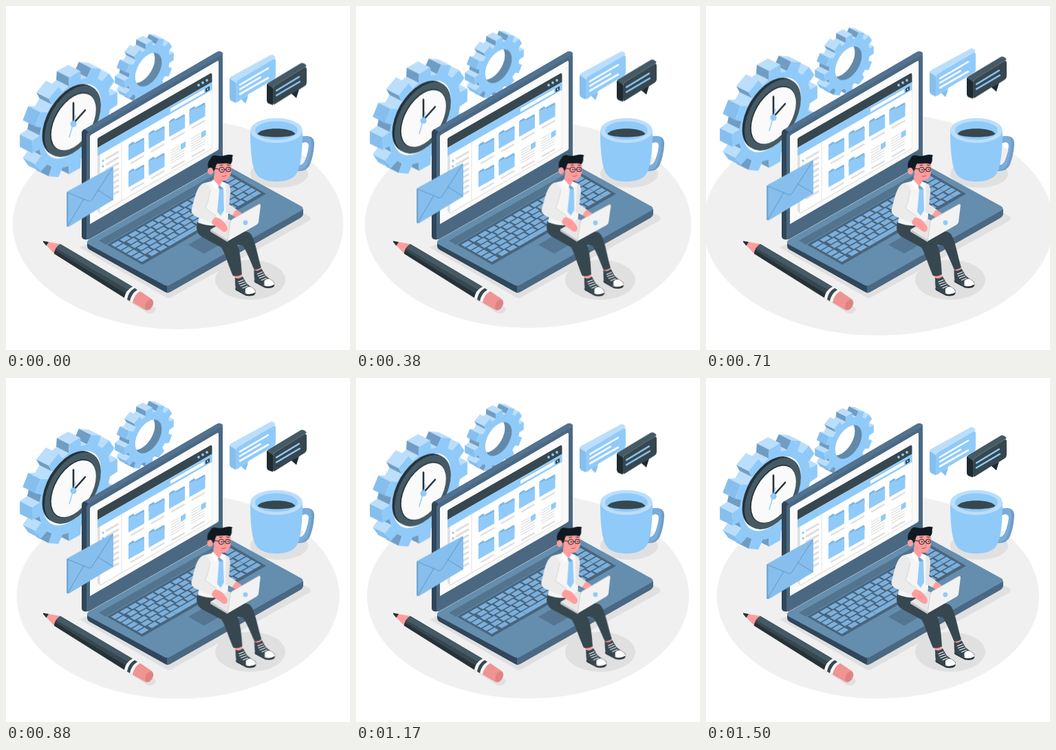
Animation, 500 px wide and 500 px high, one loop 1540 ms. Source, as an HTML page:

```html
<!DOCTYPE html>
<html lang="en">
<head>
<meta charset="utf-8">
<title>Working online</title>
<style>
html, body { margin: 0; width: 100%; height: 100%; overflow: hidden; background: #fff; }
svg { display: block; width: 100vw; height: 100vh; }
.beat, .float, .sway { animation: 1.54s linear -.04s infinite; }
.beat { animation-name: beat; transform-origin: 250px 317px; }
.float { animation-name: float; }
.sway { animation-name: sway; transform-origin: 330px 318px; }
@keyframes beat {
  0%, 30%, 40%, 60%, 100% { transform: scale(1); }
  10%, 50% { transform: scale(1.1); }
}
@keyframes float {
  0%, 100% { transform: translateY(0); }
  50% { transform: translateY(-10px); }
}
@keyframes sway {
  0%, 100% { transform: rotate(0); }
  25% { transform: rotate(1deg); }
  75% { transform: rotate(-1deg); }
}
.blue { fill: #90caf9; }
.soft { fill: #86bfee; }
.pale { fill: #bbdefb; }
.deep { fill: #709dc4; }
.ink { fill: #37474f; }
.night { fill: #263238; }
.skin { fill: #ff9d9d; }
.shade { fill: #e0e0e0; }
.line { fill: none; stroke-linecap: round; stroke-linejoin: round; }
</style>
</head>
<body>
<svg viewBox="0 0 500 500">
  <defs><clipPath id="hole"><circle r="22" transform="matrix(.88 -.5 0 1 207 93)"/></clipPath></defs>
  <ellipse class="beat" cx="250" cy="317" rx="234" ry="149" fill="#f0f0f0"/>

  <g class="shade">
    <path d="M107 351L232 423Q236 426 241 423L441 312Q445 308 440 305L330 245Z"/>
    <ellipse cx="355" cy="398" rx="51" ry="29"/>
    <ellipse cx="397" cy="244" rx="42" ry="20"/>
    <path d="M75 364L205 446Q216 450 218 439L190 420L100 368Z"/>
  </g>

  <g class="float">
    <g id="gears"></g>
    <g id="clock"></g>
    <g class="line" stroke="#263238" stroke-width="2.6">
      <path d="M98 171V141.500M98 171L115 152"/>
      <path d="M101 160L92 191" stroke="#90caf9" stroke-width="1.4"/>
    </g>
    <circle class="blue" cx="98" cy="172" r="4.600"/>
  </g>

  <g class="float">
    <path class="blue" d="M334 113Q334 110 337 108L388 78Q392 76 392 80V102Q392 105 389 107L352 129L348 142L342 136L337 140Q334 142 334 138Z"/>
    <path class="pale" d="M325 106Q326 103 329 102L384 72Q388 70 391 74Q393 76 388 78L337 108Q334 110 334 113Z"/>
    <path class="soft" d="M325 106L334 112V141.500L327 138Q325 136 325 134ZM342 136L348 142L352 132Z"/>
    <path class="line" stroke="#fff" stroke-width="2.600" d="M340 115L381 91M340 121.500L370 104M340 128.500L381 105"/>
    <path class="ink" d="M388 121Q388 118 391 116L433 90Q437 88 437 92V112Q437 115 434 117L426 122L422 134L415 128L391 143Q388 145 388 141Z"/>
    <path fill="#455a64" d="M379 115Q380 112 383 111L428 84Q432 82 436 86Q438 88 433 90L391 116Q388 118 388 121Z"/>
    <path fill="#1f2b31" d="M379 114L388 120V144.500L381 142Q379 140 379 138ZM415 128L422 134L425 123Z"/>
    <path class="line" stroke="#90caf9" stroke-width="2.400" d="M393 123.500L426 103.500M393 130.500L427 110.500"/>
  </g>

  <g>
    <path fill="#30465a" d="M118 343V349Q118 352 121 354L230 415L234 417V403L123 342Z"/>
    <path fill="#4a6882" d="M234 403V417Q237 417 240 415L428 308Q432 305 432 302V295Z"/>
    <path fill="#658dae" d="M119 346Q116 343 120 340L316 229L429 291Q434 294 429 297.500L239 405Q234 408 229 405Z"/>
    <path fill="#52748f" d="M135 341L312 240L322 245L145 347Z"/>
    <path fill="#547692" d="M265 347L310 321L333 334L288 360Z"/>
    <path fill="#48657d" d="M147 347L327 243L378 273L198 376Z"/>
    <path id="keys" fill="#7cafdb"/>
    <path fill="#527290" d="M110 185Q110 181 114 179L306 67Q311 64 315 68V228L119 339Q110 340 110 334Z"/>
    <path fill="#4a6882" d="M117 189Q117 185 120 183L310 73Q315 70 315 75V229L121 339Q117 340 117 336Z"/>
    <path fill="#30465a" d="M110 185Q110 181 114 179L120 183Q117 185 117 189V336Q117 339 119 339Q110 341 110 334Z"/>
    <path fill="#fafafa" d="M122 190Q122 188 124 187L307 80Q309 79 309 82V207Q309 209 307 210L122 317Z"/>
  </g>

  <g>
    <path class="shade" d="M133 198L137 195V302L133 298ZM137 302L300 207.500V206L137 300Z"/>
    <path fill="#fff" d="M136.500 203L299.500 108V207L136.500 301Z" stroke="#e6e6e6" stroke-width=".8"/>
    <path class="ink" d="M133 193.500Q133 192 135 191L297 98Q299.500 97 299.500 100V110.500L133 206Z"/>
    <path class="blue" d="M133 206L299.500 110.500V122L133 218Z"/>
    <path fill="#fafafa" d="M239 149L288 121V126L239 154Z"/>
    <path class="ink" d="M290 120L296 116.500V122L290 125.500Z"/>
    <circle cx="293" cy="121" r="1.200" fill="#90caf9"/>
    <g class="blue"><circle cx="280" cy="115" r="1.900"/><circle cx="286" cy="111.500" r="1.900"/><circle cx="292" cy="108" r="1.900"/></g>
    <path class="line" stroke="#e0e0e0" stroke-width="1" d="M168 198V283"/>
    <g id="items"></g>
  </g>

  <g class="float">
    <path class="soft" d="M88 273Q88 270 91 269L153 235Q156 233 156 237V280Q156 283 153 284L92 321Q88 322 88 318Z"/>
    <path fill="#76a8d2" d="M88 271L90.500 273V321Q88 322 88 318Z"/>
    <path class="line" stroke="#6597c1" stroke-width="1" d="M90 320L113 281M155.500 282L133 268M89.500 271.500L120 284Q123 285 125 282L155 235.500"/>
  </g>

  <g>
    <path class="deep" d="M426 190L438 189Q449 190 448 202Q447 217 442 230Q438 241 422 240V231Q432 233 435 224Q440 211 440 203Q440 198 435 198L426 200Z"/>
    <path fill="#7aadd9" d="M428 190L437 189Q445 190 444 202Q443 217 438 230Q434 239 422 239V232Q432 233 435 224Q440 211 440 203Q440 198 435 198L428 199Z"/>
    <path class="blue" d="M355 181C355 213 358 236 364 244C373 259 413 259 422 244C428 236 431 213 431 181Z"/>
    <ellipse class="pale" cx="393" cy="181" rx="38" ry="18"/>
    <ellipse class="blue" cx="393" cy="181" rx="31" ry="13.500"/>
    <path class="ink" d="M365.500 186C370 175.500 416 175.500 420.500 186C414 192 372 192 365.500 186Z"/>
  </g>

  <g>
    <path class="skin" d="M56 342L79 346L70 360L55 344Z"/>
    <path class="night" d="M54 341.500L62 343L58.500 348.500L54 343Z"/>
    <path class="ink" d="M79 346L184 408L172 424L70 360Q71 350 79 346Z"/>
    <path fill="#455a64" d="M79 346L184 408L180 414L73 352Z"/>
    <path class="night" d="M70 360L71 355L174 418L172 424Z"/>
    <path fill="#f5f5f5" d="M184 408L195 414.500Q186 420 184 431L172 424Q174 413 184 408Z"/>
    <path class="ink" d="M187 410L191 412.500Q182 418 180 429L176 426.500Q178 415 187 410Z"/>
    <path fill="#f09393" d="M195 414.500L212 426Q216 430 213 436Q209 444 203 442L184 431Q186 420 195 414.500Z"/>
    <ellipse cx="208" cy="434" rx="5" ry="8" transform="rotate(29 208 434)" fill="#de8384"/>
  </g>

  <g class="sway">
    <g id="shoe">
      <path class="skin" d="M331 390L342 388L344 396L334 398Z"/>
      <path class="ink" d="M333 395Q339 398 344 393L349 402C353 408 363 410 363 415L347 418L334 411Q333 404 333 395Z"/>
      <path fill="#fff" d="M348 411Q352 406 357 409Q364 413 362 417Q355 420 348 417Z"/>
      <path class="night" d="M333 410L347 418Q356 420.500 363 416Q363 421 355 421.500Q349 422 345 419L334 413Z"/>
      <path class="line" stroke="#fff" stroke-width="1.200" d="M338 401L345 398M339 404L347 401M341 407L349 404M344 410L351 407"/>
    </g>
    <use href="#shoe" x="27.500" y="-11.500"/>
    <path class="ink" d="M318 340L345 328Q353 327 357 333C363 344 366 364 371 380Q366 384 361 383C355 371 350 356 344 348L330 346Z"/>
    <path class="ink" d="M278 314Q274 331 287 337L313 351C318 358 324 379 330 392Q337 394 343 390C342 372 340 352 335 345L322 338L330 322L322 314Z"/>
    <path fill="#f5f5f5" d="M286 258L301 254L316 256Q325 258 326 266L322 316Q300 323 279 315L284 290Z"/>
    <path fill="#e6e6e6" d="M320 258Q326 260 326 270L324 288L337 297L331 305L319 300Z"/>
    <path class="blue" d="M308 261L315 260L316 266L317 297L312 305L307 299L310 266Z"/>
    <path fill="#6fa7d6" d="M308 261L315 260L315 266L310 267Z"/>
    <path class="skin" d="M302 246L314 250V258L309 262L302 256Z"/>
    <path fill="#fff" d="M301 252L309 261L305 267L298 257ZM314 255L317 258L316 265L311 261Z"/>
    <path class="skin" d="M303 226L326 224Q329 238 326 246Q323 253 316 254Q307 254 303 247Z"/>
    <path fill="#0f1a20" d="M294 237C291 225 298 223 298 220C302 215 306 218 310 218C317 219 323 214 330 217C327 220 331 225 326 230C319 227 313 230 307 229C304 232 305 236 303 239L300 240Z"/>
    <ellipse class="skin" cx="297" cy="240" rx="4" ry="5"/>
    <g class="line" stroke="#263238" stroke-width="1.100">
      <circle cx="313.500" cy="238" r="3.700"/>
      <circle cx="323" cy="237.500" r="3.300"/>
      <path d="M301 236L309.800 237M317.200 237.500H319.700"/>
      <path d="M311 231.500L315 231M321 231L325 231.500" stroke-width="1"/>
      <path d="M314 247.500Q317 248 320 246.500" stroke="#b05b62" stroke-width="1"/>
      <path d="M318.500 239L320 243L318 243.500" stroke="#e57f82" stroke-width=".8"/>
    </g>
    <circle cx="314" cy="238" r="1" class="night"/><circle cx="323.500" cy="237.500" r="1" class="night"/>
    <path fill="#ebebeb" d="M286 258Q296 257 297 268Q294 284 290 294L307 306L300 316L276 306Q268 302 270 295C274 281 276 264 286 258Z"/>
    <path class="line" stroke="#d0d0d0" stroke-width=".8" d="M297 268Q294 284 290 294L305 305"/>
    <path fill="#e6e6e6" d="M297 325L323 310L345 319L322 341Z"/>
    <path fill="#c9c9c9" d="M297 325L322 340V343L297 328Z"/>
    <path class="skin" d="M334 296Q342 299 344 304L335 308L329 304Z"/>
    <path class="skin" d="M304 307Q314 309 318 316Q324 322 321 327Q317 330 313 326L300 317Q297 313 304 307Z"/>
    <path fill="#f2f2f2" d="M326 315Q326 312 329 310L367 288.500Q370 287 370 290L367 314Q367 316 364 318L322 342Z"/>
    <path class="line" stroke="#cfcfcf" stroke-width="1" d="M322 342L326 314Q326 312 329 310L368 288"/>
    <circle class="blue" cx="348" cy="315" r="3.400"/>
  </g>
</svg>
<script>
const byId = id => document.getElementById(id);
const poly = (pts, cls) => `<path class="${cls}" d="M${pts.map(p => p.map(n => n.toFixed(1))).join('L')}Z"/>`;
const disc = (x, y, r, fill) => `<circle r="${r}" transform="matrix(.88 -.5 0 1 ${x} ${y})" fill="${fill}"/>`;

// Toothed wheel in the plane of the screen, extruded back along (dx, dy).
function gear(cx, cy, r, dx, dy) {
  const pts = [];
  for (let k = 0; k < 12; k++)
    for (const [off, size] of [[-10, .83], [-7.5, 1], [7.5, 1], [10, .83]]) {
      const a = (k * 30 + off) * Math.PI / 180, c = Math.cos(a);
      pts.push([cx + .88 * r * size * c, cy - r * size * (.5 * c + Math.sin(a))]);
    }
  const depth = p => p[0] * dx + p[1] * dy;
  const back = ([x, y]) => [x + dx, y + dy];
  const sides = pts.map((p, i) => ({ p, q: pts[(i + 1) % pts.length], tip: i % 4 === 1 }))
    .filter(({ p, q }) => (p[1] - q[1]) * dx + (q[0] - p[0]) * dy > 0)
    .sort((a, b) => depth(a.p) + depth(a.q) - depth(b.p) - depth(b.q))
    .map(({ p, q, tip }) => {
      const up = (p[0] - q[0]) / Math.hypot(q[0] - p[0], q[1] - p[1]);
      return poly([p, q, back(q), back(p)], up > .5 ? 'pale' : tip ? 'soft' : 'deep');
    });
  return sides.join('') + poly(pts, 'blue');
}

byId('gears').innerHTML =
  gear(208, 94, 41, -14, -7) + disc(207, 93, 22, '#6389a9') +
  `<g clip-path="url(#hole)">${disc(197, 88, 22, '#fff')}</g>` +
  gear(100, 170, 71, -18, -9);
byId('clock').innerHTML =
  '<ellipse rx="60" ry="33" transform="translate(96 168) rotate(-59)" fill="#fff"/>' +
  disc(93.5, 166, 46.5, '#263238') + disc(97, 168, 46.5, '#455a64') +
  disc(97.5, 168.5, 38, '#263238') + disc(98.3, 169, 37, '#fafafa');

// Keyboard: u runs along a row, v towards the front.
const at = (u, v) => [150 + 177 * u + 48 * v, 347 - 102 * u + 27 * v].map(n => n.toFixed(1));
const key = (u, v, w, h) => `M${[at(u, v), at(u + w, v), at(u + w, v + h), at(u, v + h)].join('L')}Z`;
let keys = '';
for (let row = 0; row < 6; row++)
  for (let col = 0; col < 14; col++) {
    const space = row === 5 && col > 3 && col < 9;
    if (space && col > 4) continue;
    const shift = row % 2 && !space && col && col < 13 ? .012 : 0;
    keys += key(.008 + col * .071 + shift, .03 + row * .16, space ? .342 : .057, .125);
  }
byId('keys').setAttribute('d', keys);

const bar = (x, y, w, s = 2.2) =>
  `<path class="line" stroke="#dedede" stroke-width="${s}" stroke-linecap="butt" d="M${x} ${y}l${w} ${-w * .575}"/>`;
const folder = (x, y) => `<g transform="translate(${x} ${y})">
  <path fill="#79b4e6" d="M0 6L1 4L7 0L9 2L22 -5.500L23 -4V2L0 15Z"/>
  <path class="blue" d="M0 7L9 2.500L11 3.500L23 -3V14.500L0 27.500Z"/></g>` + bar(x + 4, y + 31.5, 18);
const doc = (x, y) => {
  let s = '';
  for (let i = 0; i < 6; i++) s += bar(x, y + 10 + i * 3.7, i < 2 ? 12 : 19, 1.1);
  return s + `<path class="blue" d="M${x + 14} ${y + 1}l7 -4v8l-7 4Z"/>` + bar(x + 1, y + 36, 18);
};
let items = '';
for (let i = 0; i < 4; i++) {
  const x = 178 + i * 29.5, y = 197 - i * 17.1;
  items += folder(x, y) + (i < 2 ? folder(x, y + 39) : doc(x + 3, y + 37));
}
for (let i = 0; i < 8; i++)
  items += bar(146, 222 + i * 8.2, 17, 3) +
    (i < 2 ? `<circle class="blue" cx="141" cy="${225 + i * 8}" r="1.700"/>` : '');
byId('items').innerHTML = items;
</script>
</body>
</html>
```
